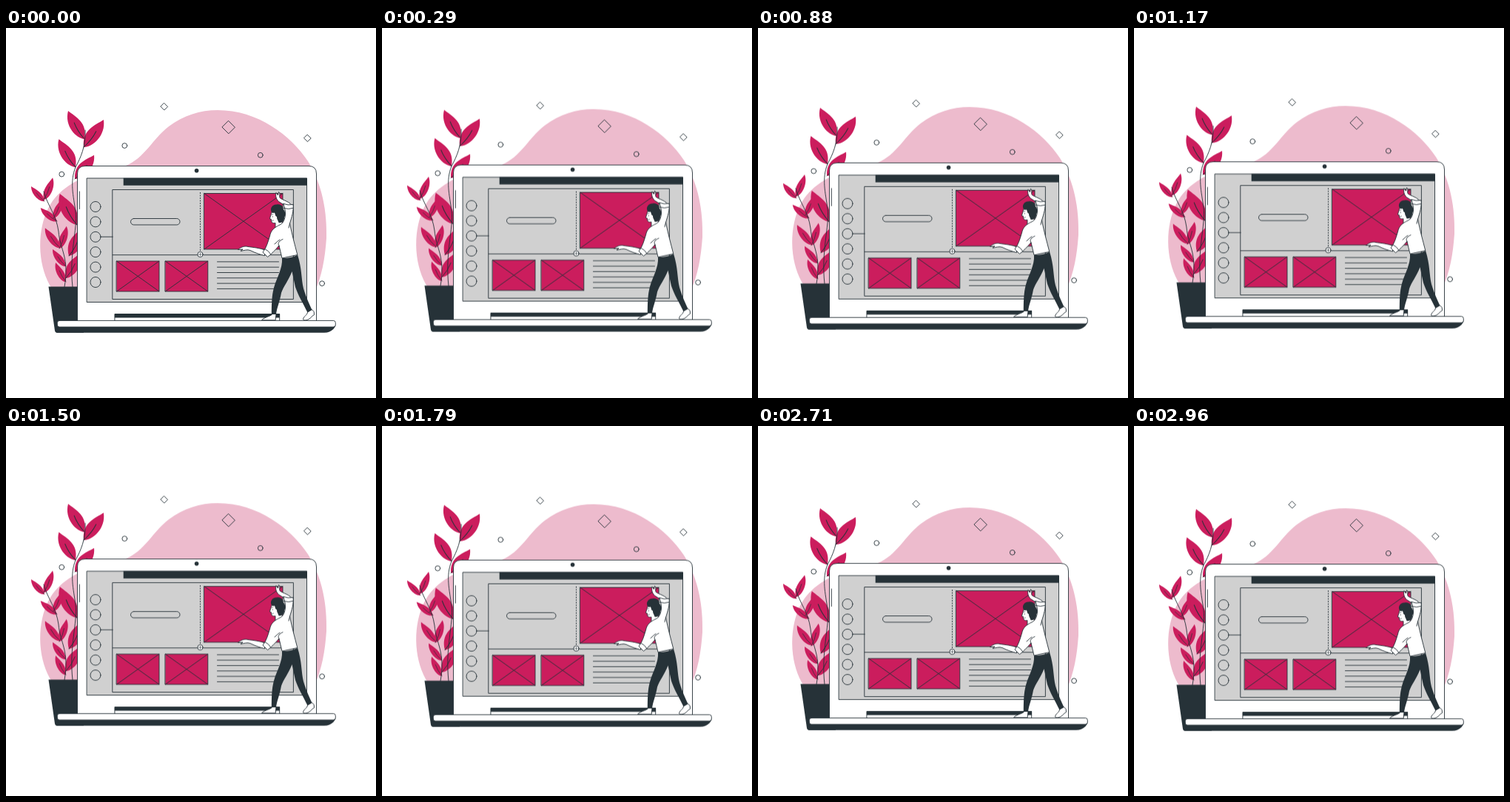
Recreate the animation shown at these times as an HTML page without scripts. Size 500 px wide and 500 px high, loop 3000 ms.

```html
<!DOCTYPE html>
<html lang="en">
<head>
<meta charset="utf-8">
<title>Floating laptop</title>
<style>
html, body { margin: 0; width: 100%; height: 100%; overflow: hidden; background: #fff; }
svg { display: block; width: 100vw; height: 100vh; }
.scene { animation: bob 1.5s linear -60ms infinite alternate; }
@keyframes bob {
  from { transform: translateY(.3px); }
  to { transform: translateY(-7.05px); }
}
.line { fill: none; stroke: #263238; stroke-width: .9; stroke-linejoin: round; stroke-linecap: round; }
.white { fill: #fff; }
.grey { fill: #d0d0d0; }
.red { fill: #cb1d5d; }
.dark { fill: #263238; }
.thin { stroke-width: .6; }
.dash { stroke-dasharray: 2 1.5; stroke-linecap: butt; }
</style>
</head>
<body>
<svg viewBox="0 0 500 500">
<defs>
  <g id="leaf">
    <path class="red" d="M0 0C-9-6-15-29 0-44C5-31 15-17 0 0Z"/>
    <path class="line" d="M0 0Q-3-14-1-26"/>
  </g>
  <g id="slim">
    <path class="red" d="M0 0C-9-4-13-30 0-44C3-31 11-17 0 0Z"/>
    <path class="line" d="M0 0Q-3-14-1-26"/>
  </g>
  <g id="thumb">
    <rect class="line red" width="57.5" height="41"/>
    <path class="line" d="M0 0L57.5 41M57.5 0L0 41"/>
  </g>
  <circle id="tool" class="line" r="7"/>
  <circle id="ring" class="line" r="3.4"/>
  <path id="gem" class="line" d="M0-4.7L4.7 0L0 4.7L-4.7 0Z"/>
  <path id="row" class="line" d="M285.5 0H368.5"/>
</defs>

<g class="scene">
  <path fill="#edbbcd" d="M62 352C44 325 41 280 55 248C67 221 90 207 118 197C136 190 148 190 162 186C187 176 198 150 220 133C240 118 262 111 286 111C340 111 385 145 408 180C428 212 434 250 433 284C431 312 427 335 417 357Z"/>

  <!-- sparks -->
  <use href="#gem" x="213.8" y="106.3"/>
  <use href="#gem" x="407.5" y="149"/>
  <path class="line" d="M300.8 125.6L309.4 134.2L300.8 142.8L292.2 134.2Z"/>
  <use href="#ring" x="160.3" y="159"/>
  <use href="#ring" x="343.8" y="171.8"/>
  <use href="#ring" x="75.3" y="197.6"/>
  <use href="#ring" x="427.1" y="345.2"/>

  <!-- plant -->
  <use href="#leaf" transform="translate(106 150) rotate(-30)"/>
  <use href="#leaf" transform="translate(105 161) rotate(36) scale(-1.04 1.04)"/>
  <use href="#leaf" transform="translate(94 188) rotate(-31)"/>
  <use href="#leaf" transform="translate(93 204) rotate(39) scale(-.94 .94)"/>
  <use href="#leaf" transform="translate(96 266) rotate(-29) scale(1.09)"/>
  <use href="#leaf" transform="translate(85 308) rotate(27) scale(-1 1)"/>
  <use href="#leaf" transform="translate(81 338) rotate(30) scale(-.88 .88)"/>
  <use href="#slim" transform="translate(52 234) rotate(-42) scale(.61)"/>
  <use href="#slim" transform="translate(51 232) rotate(22) scale(-.73 .73)"/>
  <use href="#slim" transform="translate(69 261) rotate(-51) scale(.65)"/>
  <use href="#slim" transform="translate(64 257) rotate(24) scale(-.65 .65)"/>
  <use href="#slim" transform="translate(73 297) rotate(-37) scale(.76)"/>
  <use href="#slim" transform="translate(72 298) rotate(18) scale(-.72 .72)"/>
  <use href="#slim" transform="translate(81 322) rotate(-38) scale(.66)"/>
  <use href="#slim" transform="translate(81 343) rotate(-28) scale(.67)"/>
  <path class="line" d="M107 138C108 160 101 175 94 188C86 208 91 226 94 248C97 272 85 305 90 350"/>
  <path class="line" d="M51 221C56 240 68 252 71 275C73 300 86 310 79 350"/>
  <path class="dark" d="M57.5 349.5H105V411.8H69Q66.5 411.8 66 409Z"/>

  <!-- laptop -->
  <path class="line white" d="M96.5 396V197Q96.5 186.5 107 186.5H409Q419.5 186.5 419.5 197V396Z"/>
  <path class="line" d="M99.3 221V244.5"/>
  <circle class="dark" cx="257.6" cy="192.7" r="2.8"/>
  <rect class="line grey" x="109.5" y="203" width="297" height="167.5"/>
  <path class="dark" d="M158.7 202.8H407V212.7H158.7Z"/>
  <rect class="line" x="144.2" y="218.5" width="244.2" height="148"/>
  <path class="line" d="M144.2 306.7H388.4M128 282.2H144.2"/>
  <use href="#tool" x="121" y="241.5"/>
  <use href="#tool" x="121" y="261.9"/>
  <use href="#tool" x="121" y="282.3"/>
  <use href="#tool" x="121" y="302.7"/>
  <use href="#tool" x="121" y="323.1"/>
  <use href="#tool" x="121" y="343.5"/>
  <rect class="line" x="168.5" y="257.5" width="66.5" height="8.5" rx="4.25"/>
  <path class="line dash" d="M262.5 222V302"/>
  <circle class="line white" cx="262.5" cy="306" r="3.6"/>
  <path class="line thin" d="M260.5 306H264.5M262.5 304V308"/>
  <rect class="line red" x="267.8" y="223.5" width="106.2" height="75.5"/>
  <path class="line" d="M267.8 223.5L374 299M374 223.5L267.8 299"/>
  <use href="#thumb" x="149.5" y="315"/>
  <use href="#thumb" x="215.3" y="315"/>
  <use href="#row" y="315.9"/>
  <use href="#row" y="323.2"/>
  <use href="#row" y="330.5"/>
  <use href="#row" y="337.8"/>
  <use href="#row" y="345.1"/>
  <use href="#row" y="352.4"/>
  <rect class="line white" x="147.3" y="386.5" width="222.4" height="9.5"/>
  <path class="dark" d="M147 386H370V391.5H147Z"/>
  <path class="dark" d="M67 402H445.5Q444 407 437 410.5Q434 411.8 430 411.8H69Q67 411.8 67 409Z"/>
  <rect class="line white" x="69.3" y="395.4" width="376" height="8.6" rx="3"/>

  <!-- woman -->
  <g class="line white">
    <path d="M360 386.5C358 390 349 390.5 345.5 394.8H364.2L365 386.5Z"/>
    <path d="M407.5 383.5C408 388 402 389 401.5 394Q402 395.5 406 394.8C411 394 413 389 416.5 387.5Q417.5 383 413.5 380.5Z"/>
    <path d="M388 242C384 234 374 233 370 229.5C369 226 371 223 368.5 221.5L367.5 226L365 222.5C364 227 365 231 368.5 234.5L377 240Z"/>
    <path d="M350 300C342 297 334 296.5 327 295.5C322 294 317 296.5 313.5 299.5L320 299L317 301.5C322 300.5 326 299 330 300.5C337 304 343 306 349 307.5Z"/>
    <path d="M359 249C358 253 357 255 356.5 258L358.5 258.5C358 262 360 264.5 364 263.5L364 270L374 266L370 249Z"/>
    <path d="M375 237.5Q381 240 388 238.5C389 247 386 256 383.5 264C386 277 390 292 393.8 306.5L373 311L369 294C364 300 358 306 353.5 309.5L347 303C352 297 354 289 356.5 281C358 273 363 269.5 370 266C375 264 377 258 377.5 252C378 247 376 242 375 237.5Z"/>
  </g>
  <path class="line" d="M375.5 243.5Q382 245.5 387.5 243.5M350.5 299Q355 301 357.5 305.5M369 294C366 291 370 287 374 285.5M363 292Q367 288 370 286M383.5 264L382 270"/>
  <path class="dark" d="M359 249C356 244 360 238 366 238.5C371 237.5 375 241 374.5 245C378 248 378 253 376 256C376.5 261 372 264 368.5 263C367.5 259 366 259 366 255C363 254 364.500 251 362.5 249.500Q360.5 250.500 359 249Z"/>
  <path class="line thin" d="M359 252.5L361 251.5M360.3 254.5V255.5M359.5 260.5L361.5 260"/>
  <path class="dark" d="M373 311C384 311 390 309 394 306.5C400 325 399 340 402 352C406 365 410 373 413.5 381L407.5 384.5C401 371 395 362 391 350L386.5 329C382 341 375 349 372 358C370 370 366 378 365 387H358.8C359 373 359 362 362 351C366 337 374 325 373 311Z"/>
</g>
</svg>
</body>
</html>
```
